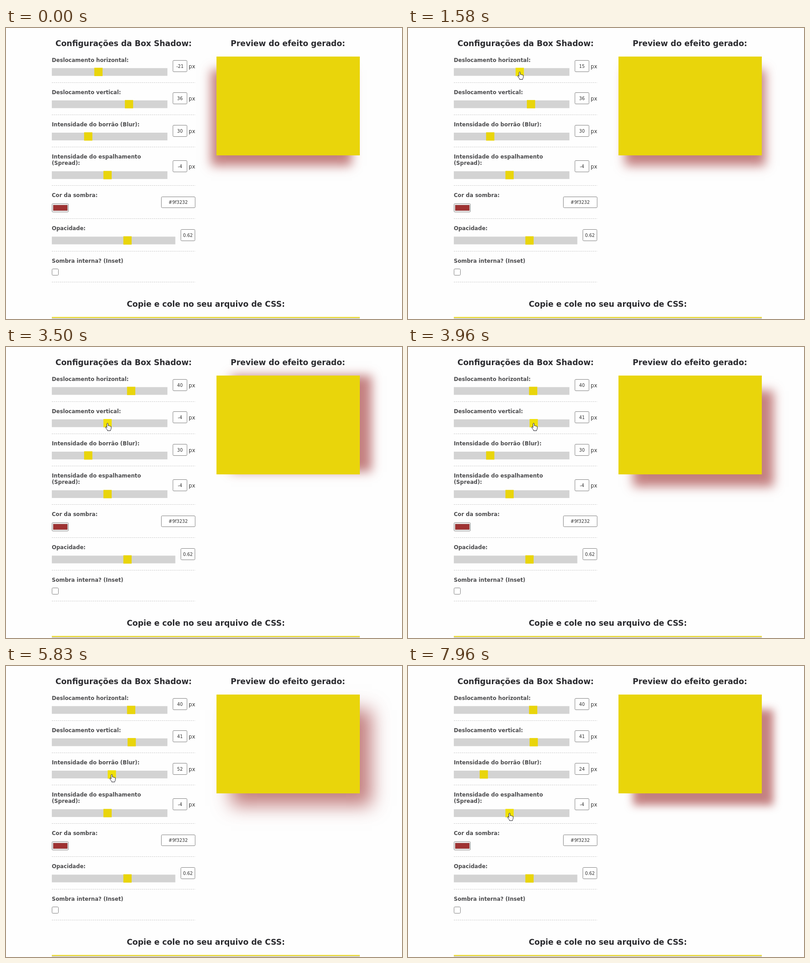
An HTML page for the animation above (8 s loop, 873 px wide and 642 px high).

```html
<!DOCTYPE html>
<html lang="pt">
<head>
<meta charset="utf-8">
<title>Box Shadow</title>
<style>
  html, body { margin: 0; width: 100%; height: 100%; overflow: hidden; background: #fefefe; }
  #preview { position: absolute; left: 463.6px; top: 63px; width: 316px; height: 217.5px; background: #e9d50b; }
  svg { position: absolute; left: 0; top: 0; font-family: "DejaVu Sans", Verdana, sans-serif; }
  .head { font-size: 17.3px; font-weight: bold; fill: #2a2a2e; text-anchor: middle; }
  .label { font-size: 11.72px; font-weight: bold; fill: #4c4c4e; }
  .unit { font-size: 11.6px; fill: #333; }
  .num { font-size: 9.7px; fill: #333; text-anchor: middle; }
  .field { fill: #fff; stroke: #808080; }
  .track { fill: #d3d3d3; }
  .thumb { fill: #e9d50b; }
  .thumb.hot { fill: #efe008; }
  .swatch { fill: #9f3232; stroke: #8a6a6a; stroke-width: .6; }
  .rule { stroke: #cdcdcd; stroke-dasharray: 3 1.5; }
  .pointer { fill: #fff; stroke: #1c1c24; stroke-linejoin: round; }
</style>
</head>
<body>
<div id="preview"></div>
<svg width="873" height="642" viewBox="0 0 873 642">
  <text class="head" x="259.3" y="40">Configurações da Box Shadow:</text>
  <text class="head" x="621.5" y="40">Preview do efeito gerado:</text>
  <text class="head" x="440.5" y="615">Copie e cole no seu arquivo de CSS:</text>
  <g id="form"></g>
  <rect x="101" y="637.6" width="679" height="2.2" fill="#e9d50b"/>
  <rect x="101" y="639.8" width="679" height="3" fill="#d3d3d3"/>
  <g id="cursor">
    <path id="arrow" class="pointer" d="M.5 .5V12.2L3.2 9.8L5 13.8L6.9 13L5.1 9.1H8.4Z"/>
    <path id="hand" class="pointer" d="M-1.4 9.2V.8Q-1.3 -.5 0 -.5T1.4 .8V5.2Q2.6 4.4 3.6 5.6Q4.9 4.8 5.9 6.2Q7.9 5.8 8 7.8V11.4Q7.8 13.4 6.6 14.4V16H-.2V14.4Q-1.6 13.2 -4 9.4Q-5 7.6 -3.6 7.3Q-2.6 7.2 -1.4 9.2Z"/>
  </g>
</svg>
<script>
const LOOP = 8000, START = 190, STEP = 66.15;
const SCALE = 0.7275, THUMB = 18.2, LEFT = 101, RIGHT = 417;
const $ = id => document.getElementById(id);

const rows = [
  { id: "x", lines: ["Deslocamento horizontal:"], min: -100, max: 100, value: -21 },
  { id: "y", lines: ["Deslocamento vertical:"], min: -100, max: 100, value: 36 },
  { id: "blur", lines: ["Intensidade do borrão (Blur):"], min: 0, max: 100, value: 30 },
  { id: "spread", lines: ["Intensidade do espalhamento", "(Spread):"], min: -100, max: 100, value: -4 },
  { lines: ["Cor da sombra:"], color: "#9f3232", height: 73 },
  { id: "opacity", lines: ["Opacidade:"], min: 0, max: 1, value: 0.62, plain: true },
  { lines: ["Sombra interna? (Inset)"], height: 68 }
];
const sliders = rows.filter(r => r.id);
const byId = Object.fromEntries(sliders.map(s => [s.id, s]));

// Values while a thumb is dragged: [time, value]
const drags = {
  x: [[1040, -21], [1570, 15], [2150, 40]],
  y: [[2860, 36], [3030, 39], [3300, -1], [3490, -4], [3600, -8], [3940, 41]],
  blur: [[5280, 30], [5850, 54], [5940, 54], [6380, 17], [6600, 18], [6850, 24]]
};

// Cursor trips between drags; "to" is a point or the slider whose thumb is grabbed
const trips = [
  { start: 190, end: 970, bend: [215, -60], to: "x" },
  { start: 2500, end: 2780, bend: [290, 130], to: "y" },
  { start: 4220, end: 4430, bend: [320, 175], to: [347, 196] },
  { start: 4430, end: 4940, bend: [158, 264], to: [179, 251.5] },
  { start: 5010, end: 5200, bend: [181, 246], to: "blur" },
  { start: 7140, end: 7850, bend: [172, 272], to: "spread" }
];
const ENTRY = [797, 595];

const mix = (a, b, p) => a + (b - a) * p;
const smooth = p => p * p * (3 - 2 * p);

function valueAt(slider, t) {
  const keys = drags[slider.id] || [[0, slider.value]];
  const i = keys.findIndex(k => t < k[0]);
  if (i === 0) return keys[0][1];
  if (i < 0) return keys[keys.length - 1][1];
  const [t0, v0] = keys[i - 1], [t1, v1] = keys[i];
  return Math.round(mix(v0, v1, (t - t0) / (t1 - t0)));
}

const thumbLeft = (s, t) =>
  LEFT + 0.2 + (valueAt(s, t) - s.min) / (s.max - s.min) * (s.width - THUMB);

function place(to, t) {
  if (Array.isArray(to)) return to;
  const s = byId[to];
  return [thumbLeft(s, t) + 9, s.top + 9];
}

function cursorAt(t) {
  let pos = ENTRY;
  for (const { start, end, bend, to } of trips) {
    if (t < start) break;
    const p = smooth(Math.min(1, (t - start) / (end - start)));
    const goal = place(to, t);
    pos = pos.map((a, i) => mix(mix(a, bend[i], p), mix(bend[i], goal[i], p), p));
  }
  return pos;
}

const rect = (cls, x, y, w, h, extra = "") =>
  `<rect class="${cls}" x="${x}" y="${y}" width="${w}" height="${h}" ${extra}/>`;
const text = (cls, x, y, s, extra = "") => `<text class="${cls}" x="${x}" y="${y}" ${extra}>${s}</text>`;
const field = (x, y, w, h) => rect("field", x, y, w, h, 'rx="2"');

function sliderMarkup(s, top, extra) {
  const right = s.plain ? RIGHT : 399.5;
  const mid = top + (s.plain ? 36 : 35.2) + extra / 2;
  s.top = top + 39.5 + extra;
  s.width = right - 43.7 - LEFT;
  return rect("track", LEFT, s.top, s.width, 17) +
    rect("thumb", LEFT, s.top - 0.8, THUMB, 18.4, `id="t-${s.id}"`) +
    field(right - 31.5, Math.round(mid - 12) - 0.5, 31, 25) +
    text("num", right - 16, mid + 4, s.value, `id="n-${s.id}"`) +
    (s.plain ? "" : text("unit", 402.8, mid + 5, "px"));
}

function build() {
  let top = 49, out = "";
  for (const row of rows) {
    const extra = (row.lines.length - 1) * 14;
    row.lines.forEach((s, i) => out += text("label", LEFT, top + 25.6 + i * 14, s));
    if (row.id) out += sliderMarkup(row, top, extra);
    else if (row.color)
      out += field(342.5, top + 24.7, 74.5, 24) + text("num", 379.5, top + 40.2, row.color) +
        field(101.5, top + 39.7, 36, 18.5) + rect("swatch", 104, top + 42.7, 31.5, 12.5);
    else out += field(101.5, top + 39.5, 14, 14);
    top += (row.height || 71.2) + extra;
    out += `<path class="rule" d="M${LEFT} ${Math.floor(top) + 0.5}H${RIGHT}"/>`;
  }
  $("form").innerHTML = out;
}

function draw(now) {
  const t = now % LOOP;
  const visible = t >= START;
  const time = visible ? START + Math.floor((t - START) / STEP) * STEP : 0;
  const [cx, cy] = cursorAt(time);
  const v = {};
  let over = false;

  for (const s of sliders) {
    v[s.id] = valueAt(s, time);
    if (s.id === "opacity") v[s.id] = s.value;
    const left = thumbLeft(s, time);
    const hot = visible && cx >= left && cx <= left + THUMB && cy >= s.top && cy <= s.top + THUMB;
    const thumb = $("t-" + s.id);
    thumb.setAttribute("x", left.toFixed(2));
    thumb.classList.toggle("hot", hot);
    $("n-" + s.id).textContent = v[s.id];
    over = over || hot;
  }

  const px = n => (n * SCALE).toFixed(2) + "px";
  $("preview").style.boxShadow =
    `${px(v.x)} ${px(v.y)} ${px(v.blur)} ${px(v.spread)} rgba(159, 50, 50, ${v.opacity})`;
  $("cursor").setAttribute("transform", `translate(${cx.toFixed(1)} ${cy.toFixed(1)})`);
  $("cursor").style.display = visible ? "" : "none";
  $("hand").style.display = over ? "" : "none";
  $("arrow").style.display = over ? "none" : "";
}

build();
const origin = performance.now();
function tick() {
  draw(performance.now() - origin);
  requestAnimationFrame(tick);
}
tick();
</script>
</body>
</html>
```
